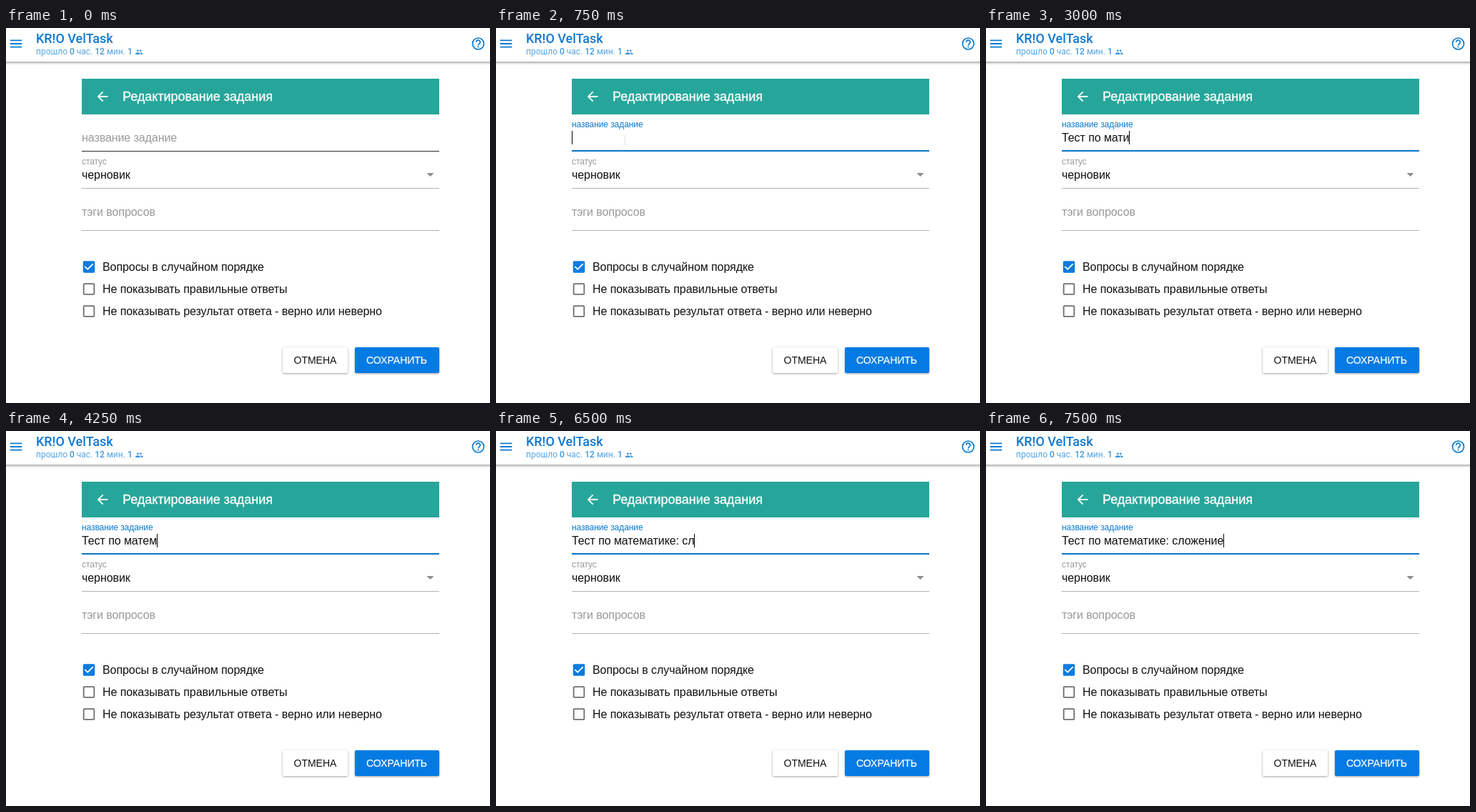
Animation, 677 px wide and 525 px high, one loop 8000 ms. Source, as an HTML page:

```html
<!DOCTYPE html>
<html lang="ru">
<head>
<meta charset="utf-8">
<style>
html, body { margin: 0; width: 100%; height: 100%; overflow: hidden; background: #fff; }
svg { display: block; }
text { font: 16px "Liberation Sans", Arial, sans-serif; letter-spacing: -.08px; fill: #111; white-space: pre; }
.brand { font: 500 18px Roboto, sans-serif; letter-spacing: 0; fill: #1279cf; }
.sub { font: 12px Roboto, sans-serif; letter-spacing: 0; fill: #55a5e4; }
.sub tspan { font-weight: 500; fill: #3c96de; }
.heading { font-size: 18px; letter-spacing: -.03px; fill: #fff; stroke: #fff; stroke-width: .3px; }
.hint { fill: #999; }
.small { font-size: 12px; }
.btn { font-size: 14px; letter-spacing: 0; }
.blue { fill: #0a7ad1; }
.bar { filter: drop-shadow(0 1px 2px rgba(0,0,0,.5)); }
.raised { filter: drop-shadow(0 1px 1.5px rgba(0,0,0,.38)); }
</style>
</head>
<body>
<svg width="677" height="525" viewBox="0 0 677 525">
  <defs>
    <!-- icons on a 24 unit grid, shown at 22px around their centre -->
    <path id="menu" transform="scale(.917) translate(-12 -12)" d="M3 18h18v-2H3zM3 13h18v-2H3zM3 6v2h18V6z"/>
    <path id="back" transform="scale(.917) translate(-12 -12)" d="M20 11H7.830l5.590-5.590L12 4l-8 8 8 8 1.410-1.410L7.830 13H20z"/>
    <path id="off" transform="scale(.917) translate(-12 -12)" d="M19 5v14H5V5h14m0-2H5a2 2 0 0 0-2 2v14a2 2 0 0 0 2 2h14a2 2 0 0 0 2-2V5a2 2 0 0 0-2-2z"/>
    <path id="on" transform="scale(.917) translate(-12 -12)" d="M19 3H5a2 2 0 0 0-2 2v14a2 2 0 0 0 2 2h14a2 2 0 0 0 2-2V5a2 2 0 0 0-2-2zm-9 14l-5-5 1.410-1.410L10 14.170l7.590-7.590L19 8z"/>
  </defs>

  <rect class="bar" x="-10" y="-10" width="697" height="57" fill="#fff"/>
  <use href="#menu" class="blue" x="14" y="22"/>
  <text class="brand" x="42" y="21">KR!O VelTask</text>
  <text class="sub" x="42" y="37">прошло <tspan>0</tspan> час. <tspan>12</tspan> мин.<tspan x="170">1</tspan></text>
  <path fill="#3c96de" transform="translate(180.5 28) scale(.48)" d="M16 11a3 3 0 1 0 0-6 3 3 0 0 0 0 6zM8 11a3 3 0 1 0 0-6 3 3 0 0 0 0 6zM8 13c-2.3 0-7 1.2-7 3.5V19h14v-2.500C15 14.200 10.300 13 8 13zM16 13l-1 .1c1.200.8 2 2 2 3.400V19h6v-2.500c0-2.300-4.700-3.500-7-3.500z"/>
  <g fill="none" stroke="#0a7ad1" stroke-width="1.700">
    <circle cx="660.500" cy="22" r="8"/>
    <path d="M657.700 19.800a2.800 2.800 0 1 1 4.700 2q-1.900 1.300-1.900 2.700M660.500 25.600v1.800"/>
  </g>

  <rect x="106" y="71" width="500" height="50" fill="#26a69a"/>
  <use href="#back" fill="#fff" x="135" y="96"/>
  <text class="heading" x="163" y="102">Редактирование задания</text>

  <text id="label" x="106">название задание</text>
  <path id="beam" d="M178 150.500h1.500l1 1 1-1h1.500M180.500 151v12M178 163.500h1.500l1-1 1 1h1.500" fill="none" stroke="#e2e2e2"/>
  <text id="input" x="106" y="159"></text>
  <rect id="caret" y="144" width="1" height="19" fill="#000"/>
  <rect id="base" x="106" y="172" width="500" height="1"/>
  <rect id="focus" x="106" y="171" height="2" fill="#0a76c4"/>

  <text class="small hint" x="106" y="191">статус</text>
  <text x="106" y="211">черновик</text>
  <path d="M588.500 203h10l-5 5z" fill="#8c8c8c"/>
  <text class="hint" x="106" y="263">тэги вопросов</text>
  <path d="M106 224h500v1H106zM106 283h500v1H106z" fill="#b2b2b2"/>

  <use href="#on" x="116" y="334.500" fill="#0a7be0"/>
  <use href="#off" x="116" y="365.500" fill="#707070"/>
  <use href="#off" x="116" y="396.500" fill="#707070"/>
  <text x="135" y="340">Вопросы в случайном порядке</text>
  <text x="135" y="371">Не показывать правильные ответы</text>
  <text x="135" y="402">Не показывать результат ответа - верно или неверно</text>

  <rect class="raised" x="387" y="447" width="91" height="36" rx="2" fill="#fff"/>
  <rect class="raised" x="488" y="447" width="118" height="36" rx="2" fill="#047be4"/>
  <text class="btn" x="402.500" y="470">ОТМЕНА</text>
  <text class="btn" x="504" y="470" style="fill:#fff;stroke:#fff;stroke-width:.2px">СОХРАНИТЬ</text>
</svg>
<script>
const LOOP = 8000;
const $ = id => document.getElementById(id);
const [label, beam, input, caret, base, focus] =
  ['label', 'beam', 'input', 'caret', 'base', 'focus'].map($);

const phrase = 'Тест по математике: сложение';
// [time, letters of the phrase, mistyped tail]
const keys = [
  [0, 0], [1500, 2], [1750, 4], [2000, 5], [2250, 8], [2500, 10], [2750, 11],
  [3000, 11, 'и'], [3500, 11], [3750, 12], [4250, 13], [4500, 15], [4750, 18],
  [5750, 19], [6000, 20], [6500, 22], [6750, 23], [7000, 26], [7250, 28]
];

function set(el, attrs) {
  for (const name in attrs) el.setAttribute(name, attrs[name]);
}

function draw(t) {
  const active = t >= 500, settled = t >= 750;
  const [, count, slip = ''] = keys.filter(k => k[0] <= t).pop();
  const value = phrase.slice(0, count) + slip;

  set(label, { y: active ? 139 : 159 });
  label.style.fontSize = (settled ? 12 : active ? 12.1 : 16) + 'px';
  label.style.fill = active ? '#0a7ad1' : '#999';
  set(base, { fill: t < 250 ? '#2b2b2b' : '#111' });
  set(focus, { width: settled ? 500 : active ? 489 : 0 });
  set(beam, { opacity: active && t < 2500 ? 1 : 0 });

  input.textContent = value;
  const width = value ? input.getComputedTextLength() : 0;
  const blink = t >= 5250 && t < 5750;
  set(caret, { x: Math.floor(106 + width), opacity: active && !blink ? 1 : 0 });
}

const start = performance.now();
let shown = -1;
function tick() {
  const t = Math.floor((performance.now() - start) % LOOP / 250) * 250;
  if (t !== shown) draw(shown = t);
  requestAnimationFrame(tick);
}
tick();
</script>
</body>
</html>
```
